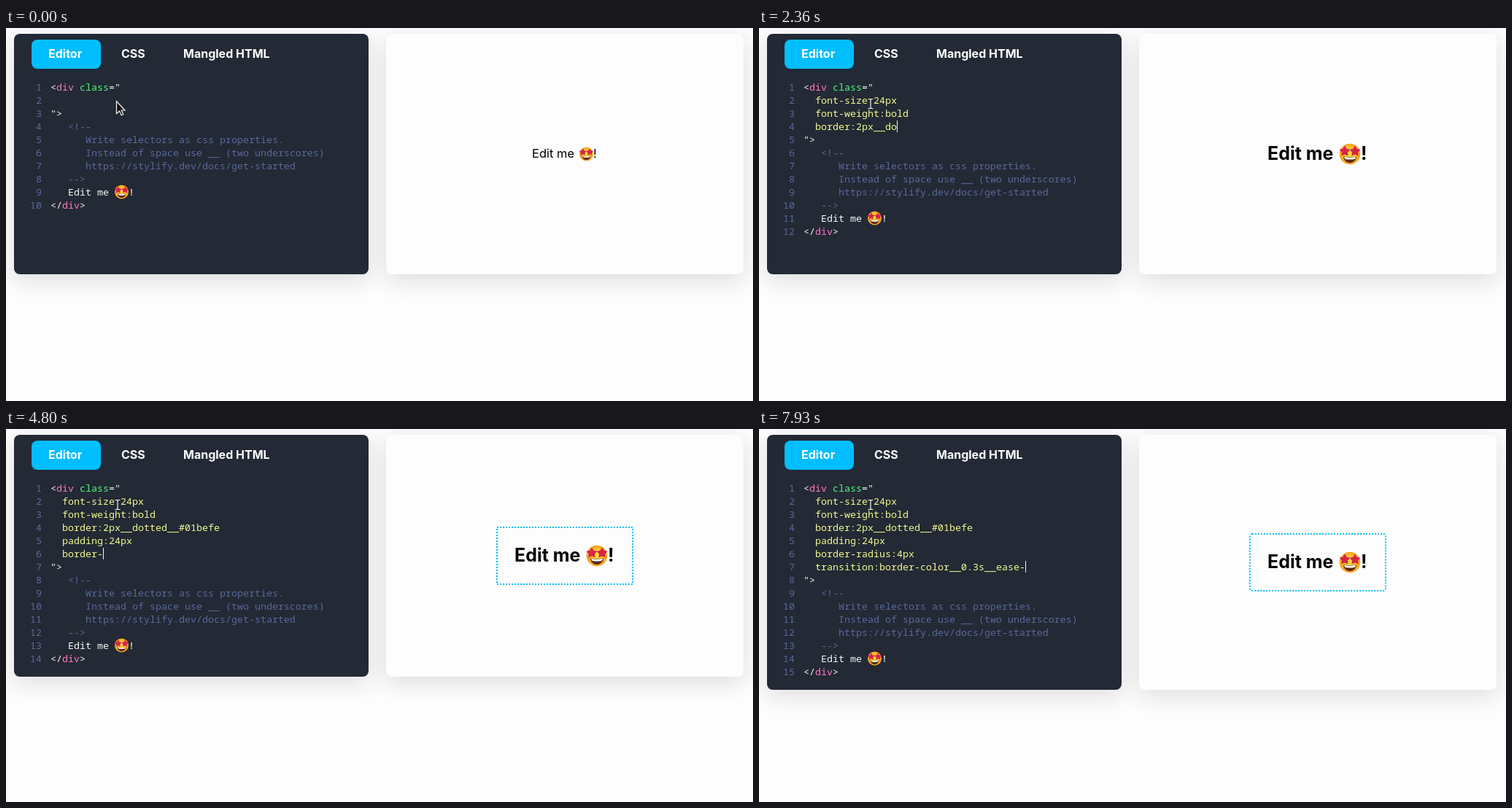
An HTML page with a canvas that plays this animation: 1024x512 px, repeating every 8000 ms.

```html
<!DOCTYPE html>
<html lang="en">
<head>
<meta charset="utf-8">
<title>Live style editor</title>
<style>
  html, body { margin: 0; width: 100%; height: 100%; overflow: hidden; background: #fdfdfd; }
  canvas { display: block; }
</style>
</head>
<body>
<canvas id="stage" width="1024" height="512"></canvas>
<script>
const ctx = document.getElementById('stage').getContext('2d');
const LOOP = 8000, CHAR = 8, LINE = 18, CODE_X = 61;
const SANS = 'Inter, sans-serif';
const MONO = '13.333px "Noto Sans Mono", monospace';
const WHITE = '#f8f8f2', YELLOW = '#f1fa8c', PINK = '#ff79c6',
      GREEN = '#50fa7b', GREY = '#5a699b', PAPER = '#fdfdfd', DARK = '#232935';

// Typing runs: time of first key, time of last key, keys. A line break also indents.
const runs = [
  [180, 220, '  '],
  [270, 850, 'font-size:24px'],
  [950, 1490, '\nfont-weight:bold'],
  [1610, 1730, '\nbor'],
  [1790, 2540, 'der:2px__dotted'],
  [2630, 2660, '__'],
  [2810, 2990, '#0'],
  [3170, 3250, '1b'],
  [3380, 3380, 'e'],
  [3440, 3470, 'fe'],
  [3690, 4470, '\npadding:24px\n'],
  [4530, 4800, 'border-'],
  [4860, 5220, 'radius:'],
  [5340, 5460, '4px'],
  [5650, 5650, '\n'],
  [5830, 5830, 't'],
  [5980, 6760, 'ransition:border'],
  [6790, 6790, '-'],
  [6850, 7510, 'color__0.3s'],
  [7630, 7930, '__ease-'],
];

function typedAt(t) {
  let text = '';
  for (const [start, end, keys] of runs) {
    if (t < start) break;
    const step = (end - start) / Math.max(1, keys.length - 1);
    const count = step ? Math.floor((t - start) / step + 1.001) : keys.length;
    text += keys.slice(0, count);
  }
  return text.replaceAll('\n', '\n  ');
}

function write(text, x, y, color, font, align = 'left') {
  ctx.font = font;
  ctx.fillStyle = color;
  ctx.textAlign = align;
  ctx.fillText(text, x, y);
}

function roundBox(x, y, w, h, r, color) {
  ctx.beginPath();
  ctx.roundRect(x, y, w, h, r);
  ctx.fillStyle = color;
  ctx.fill();
}

function panel(x, w, h, color) {
  ctx.save();
  ctx.shadowColor = 'rgba(20, 24, 40, .14)';
  ctx.shadowBlur = 32;
  ctx.shadowOffsetY = 8;
  roundBox(x, 8, w, h, 8, color);
  ctx.restore();
}

function star(x, y, r) {
  ctx.beginPath();
  for (let i = 0; i < 10; i++) {
    const a = i * Math.PI / 5 - Math.PI / 2, d = i % 2 ? r * .55 : r;
    ctx.lineTo(x + d * Math.cos(a), y + d * Math.sin(a));
  }
  ctx.closePath();
  ctx.fillStyle = '#d8234a';
  ctx.fill();
}

function starryFace(x, y, r) {
  ctx.save();
  ctx.translate(x, y);
  ctx.scale(r, r);
  const skin = ctx.createRadialGradient(0, -.1, .3, 0, 0, 1);
  skin.addColorStop(0, '#fdd835');
  skin.addColorStop(1, '#f59a1c');
  ctx.beginPath();
  ctx.arc(0, 0, .95, 0, 7);
  ctx.fillStyle = skin;
  ctx.fill();
  star(-.47, -.25, .52);
  star(.47, -.25, .52);
  ctx.beginPath();
  ctx.moveTo(-.6, .22);
  ctx.quadraticCurveTo(0, .36, .6, .22);
  ctx.bezierCurveTo(.55, 1, -.55, 1, -.6, .22);
  ctx.fillStyle = '#5c2a14';
  ctx.fill();
  ctx.beginPath();
  ctx.moveTo(-.55, .25);
  ctx.quadraticCurveTo(0, .38, .55, .25);
  ctx.quadraticCurveTo(.5, .45, .42, .46);
  ctx.quadraticCurveTo(0, .54, -.42, .46);
  ctx.fillStyle = '#fff';
  ctx.fill();
  ctx.restore();
}

function drawCode(typed, caret) {
  const styles = typed.split('\n');
  const lines = [
    [['<', WHITE], ['div', PINK], [' class', GREEN], ['="', WHITE]],
    ...styles.map(s => [[s, YELLOW]]),
    [['">', WHITE]],
    [['   <!--', GREY]],
    [['      Write selectors as css properties.', GREY]],
    [['      Instead of space use __ (two underscores)', GREY]],
    [['      https://stylify.dev/docs/get-started', GREY]],
    [['   -->', GREY]],
    [['   Edit me', WHITE]],
    [['</', WHITE], ['div', PINK], ['>', WHITE]],
  ];
  lines.forEach((parts, i) => {
    const y = 86 + i * LINE;
    let x = CODE_X;
    write(i + 1, 49, y, GREY, MONO, 'right');
    for (const [text, color] of parts) {
      write(text, x, y, color, MONO);
      x += text.length * CHAR;
    }
  });
  const faceLine = lines.length - 2;
  starryFace(158.5, 81 + faceLine * LINE, 10);
  write('!', 168, 86 + faceLine * LINE, WHITE, MONO);

  if (caret) {
    ctx.fillStyle = WHITE;
    ctx.fillRect(CODE_X + styles.at(-1).length * CHAR, 73 + styles.length * LINE, 1, 16);
  }
}

function drawPreview(css, cy) {
  const large = css.includes('font-size:24px');
  const bold = css.includes('font-weight:bold');
  const border = css.match(/border:2px__dotted(__(#\w{6}|#\w{3,4})?)?$/m);
  const font = `${bold ? 700 : 400} ${large ? 25 : 16.5}px ${SANS}`;
  const [textX, faceX, markX] = bold ? [697, 810, 825] : large ? [699, 809.5, 825] : [721, 795.5, 805];
  const baseline = cy + (large ? 8 : 5);
  write('Edit me', textX, baseline, '#000', font);
  starryFace(faceX, cy, large ? 15 : 10);
  write('!', markX, baseline, '#000', font);

  if (border) {
    const pad = css.includes('padding:24px') ? 24 : 0;
    const w = 138 + 2 * pad, h = 30 + 2 * pad;
    ctx.beginPath();
    ctx.roundRect(766 - w / 2, cy - h / 2, w, h, css.includes('radius:4px') ? 3 : 0);
    ctx.strokeStyle = border[2] || '#000';
    ctx.lineWidth = 2;
    ctx.setLineDash([2, 2]);
    ctx.stroke();
    ctx.setLineDash([]);
  }
}

const arrow = new Path2D('M151.5 100.5v17l4-3.5 2.7 5.7 2.6-1.2-2.6-5.5h4.8z');
const beam = new Path2D('M149.5 97.5h2.5l1 1 1-1h2.5M153 98.5v11M149.5 110.5h2.5l1-1 1 1h2.5');

function drawPointer(overText) {
  if (overText) {
    ctx.strokeStyle = DARK;
    ctx.lineWidth = 3.5;
    ctx.stroke(beam);
  } else {
    ctx.fillStyle = '#111';
    ctx.fill(arrow);
  }
  ctx.strokeStyle = WHITE;
  ctx.lineWidth = 1.2;
  ctx.stroke(overText ? beam : arrow);
}

function draw() {
  const t = performance.now() % LOOP;
  const typed = typedAt(t);
  const lineCount = typed.split('\n').length + 9;
  const bottom = Math.max(338, 88 + lineCount * LINE);

  ctx.fillStyle = PAPER;
  ctx.fillRect(0, 0, 1024, 512);
  panel(11, 486, bottom - 8, DARK);
  panel(521, 490, bottom - 8, PAPER);

  roundBox(35, 16, 95, 40, 8, '#01befe');
  const tabFont = `700 16px ${SANS}`;
  write('Editor', 58, 41, '#fff', tabFont);
  write('CSS', 158, 41, '#fff', tabFont);
  write('Mangled HTML', 243, 41, '#fff', tabFont);

  const focused = t >= 100;
  drawCode(typed, focused);
  drawPreview(typed, (8 + bottom) / 2);
  drawPointer(focused);
  requestAnimationFrame(draw);
}
draw();
</script>
</body>
</html>
```
